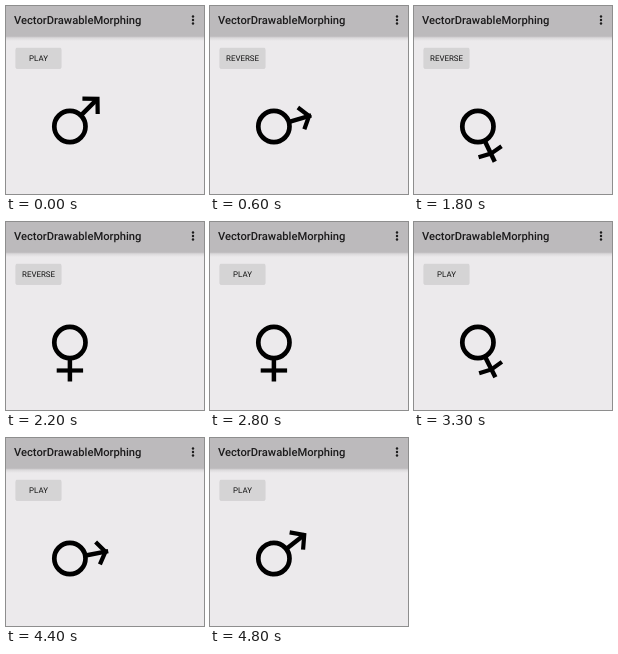
An HTML page for the animation above (4900 ms loop, 198 by 188 pixels).

```html
<!DOCTYPE html>
<html lang="en">
<head>
<meta charset="utf-8">
<title>Vector morphing</title>
<style>
  html, body { margin: 0; width: 100%; height: 100%; overflow: hidden; background: #eceaec; }
  svg { display: block; width: 198px; height: 188px; }
  text { font-family: Roboto, sans-serif; font-weight: 500; fill: #1c1b1c; text-rendering: geometricPrecision; }
  #label { font-weight: 400; fill: #111; }
</style>
</head>
<body>
<svg viewBox="0 0 198 188">
  <defs>
    <linearGradient id="shade" x1="0" y1="0" x2="0" y2="1">
      <stop offset="0" stop-color="#000" stop-opacity=".2"/>
      <stop offset=".4" stop-color="#000" stop-opacity=".07"/>
      <stop offset="1" stop-color="#000" stop-opacity="0"/>
    </linearGradient>
  </defs>
  <rect width="198" height="188" fill="#eceaec"/>
  <rect y="30" width="198" height="5" fill="url(#shade)"/>
  <rect width="198" height="30.4" fill="#bcbabc"/>
  <text x="8" y="18.2" font-size="11.2">VectorDrawableMorphing</text>
  <g fill="#1c1b1c">
    <circle cx="187" cy="10.5" r="1.2"/>
    <circle cx="187" cy="14" r="1.2"/>
    <circle cx="187" cy="17.5" r="1.2"/>
  </g>
  <rect x="9.7" y="42.6" width="45.6" height="20.2" rx="1.4" fill="#000" opacity=".13"/>
  <rect x="9.7" y="41.7" width="45.6" height="20.2" rx="1.2" fill="#d5d4d5"/>
  <text id="label" x="32.5" y="54.8" font-size="7.9" text-anchor="middle">PLAY</text>
  <g fill="none" stroke="#000" transform="translate(63.9 120.5)">
    <circle r="15.6" stroke-width="4.7"/>
    <g id="arm" stroke-width="4.2">
      <path d="M16 0H39" stroke-width="4.5"/>
      <path id="head"/>
    </g>
  </g>
</svg>
<script>
  const LOOP = 4900, STEP = 100, DURATION = 2000;
  const FORWARD = { press: 100, start: 180 };
  const BACK = { press: 2800, start: 2905 };
  const [label, arm, head] = ['label', 'arm', 'head'].map(id => document.getElementById(id));

  const mix = (a, b, k) => a + (b - a) * k;
  const progress = (t, start) => Math.min(1, Math.max(0, (t - start) / DURATION));

  function draw(now) {
    const t = Math.floor((now % LOOP) / STEP) * STEP;
    // 0 is the arrow pointing up right, 1 is the cross pointing down
    const k = progress(t, FORWARD.start) - progress(t, BACK.start);
    const end = mix(28.5, 28, k), half = mix(10.8, 13.2, k), tip = mix(39, 28, k);
    arm.setAttribute('transform', `rotate(${mix(-45, 90, k)})`);
    head.setAttribute('d', `M${end} ${-half}L${tip} 0L${end} ${half}`);
    label.textContent = t >= FORWARD.press && t < BACK.press ? 'REVERSE' : 'PLAY';
  }

  const origin = performance.now();
  function tick() {
    draw(performance.now() - origin);
    requestAnimationFrame(tick);
  }
  tick();
</script>
</body>
</html>
```
